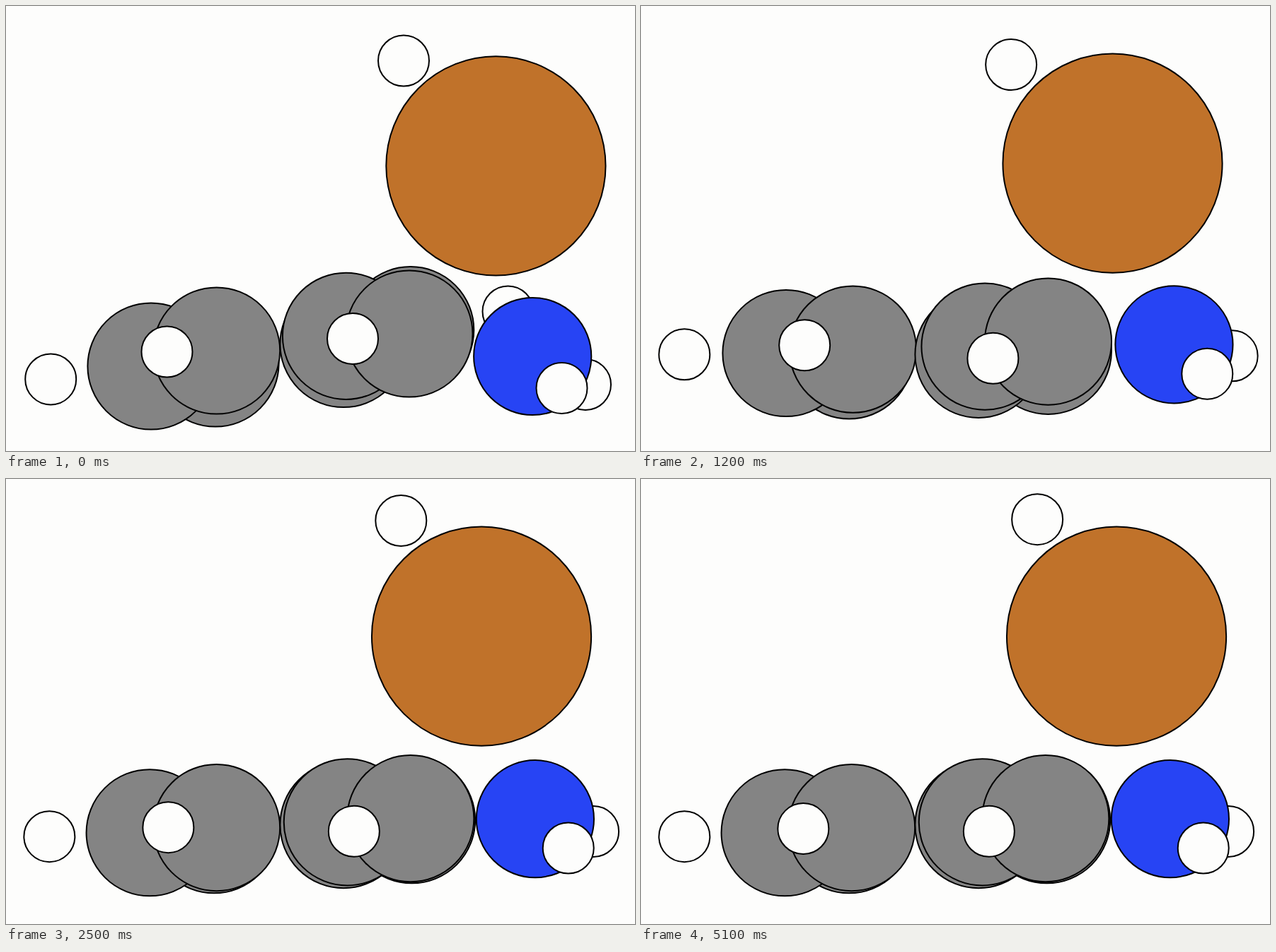
Recreate the animation shown at these times as an HTML page. Size 889 px wide and 630 px high, loop 5.2 s.

```html
<!DOCTYPE html>
<html lang="en">
<head>
<meta charset="utf-8">
<title>Settling circles</title>
<style>
  html, body { margin: 0; width: 100%; height: 100%; overflow: hidden; background: #fdfdfc; }
  svg { display: block; width: 889px; height: 630px; }
  circle { stroke: #000; stroke-width: 2; }
</style>
</head>
<body>
<svg id="stage" viewBox="0 0 889 630"></svg>
<script>
const LOOP = 5200, STEP = 100;
const PEAK = 1200;   // time of the widest swing
const SETTLE = 790;  // how slowly the swing dies away
const UNIT = 1.85;   // positions move on a grid of this size

const small = circle(36, '#fdfdfc');
const grey = circle(89.6, '#848484');
const blue = circle(83.1, '#2744f4');
const copper = circle(155.1, '#c0722a');

// Each body: start in pixels, then its swing and its rest, in grid units from the start
const bodies = [
  copper([692.4, 226.4], [-14, -2], [-11, -2]),
  small([562, 77.5], [-21, 3], [-1, -11]),
  small([63.2, 528.4], [-1, -19], [-1, -12]),

  grey([296, 506], [-1, -6], [-1, -5]),
  grey([205, 510], [0, -10], [-1, -5]),
  grey([297.6, 488], [1, -1], [0, 3]),
  small([227.5, 489.5], [2, -5], [1, 3]),

  grey([571.7, 458.7], [2, 16], [1, 13]),
  grey([477, 478.5], [0, 8], [0, 6]),
  grey([480.5, 467.3], [3, 8], [1, 10]),
  grey([569.9, 464], [3, 6], [1, 9]),
  small([490, 471], [4, 15], [1, 15]),

  small([709.5, 432.5], [5, 28], [5, 20]),
  small([819, 536], [9, -22], [6, -20]),
  blue([744.2, 496], [5, -9], [2, -8]),
  small([785.5, 541], [8, -11], [5, -10])
];

function circle(r, fill) {
  return (start, swing, rest) => {
    const el = document.createElementNS('http://www.w3.org/2000/svg', 'circle');
    el.setAttribute('r', r);
    el.setAttribute('fill', fill);
    document.getElementById('stage').append(el);
    return { el, start, swing, rest };
  };
}

// Speed up towards the swing, then relax smoothly to rest
function place({ start, swing, rest }, axis, t) {
  const peak = swing[axis], end = rest[axis];
  const shift = t < PEAK
    ? peak * (t / PEAK) ** 2.4
    : end + (peak - end) * Math.exp(-(((t - PEAK) / SETTLE) ** 2));
  return start[axis] + Math.round(shift) * UNIT;
}

function draw(ms) {
  const t = Math.floor((ms % LOOP) / STEP) * STEP;
  for (const b of bodies) {
    b.el.setAttribute('cx', place(b, 0, t));
    b.el.setAttribute('cy', place(b, 1, t));
  }
}

const began = performance.now();
function tick() {
  draw(performance.now() - began);
  requestAnimationFrame(tick);
}
tick();
</script>
</body>
</html>
```
